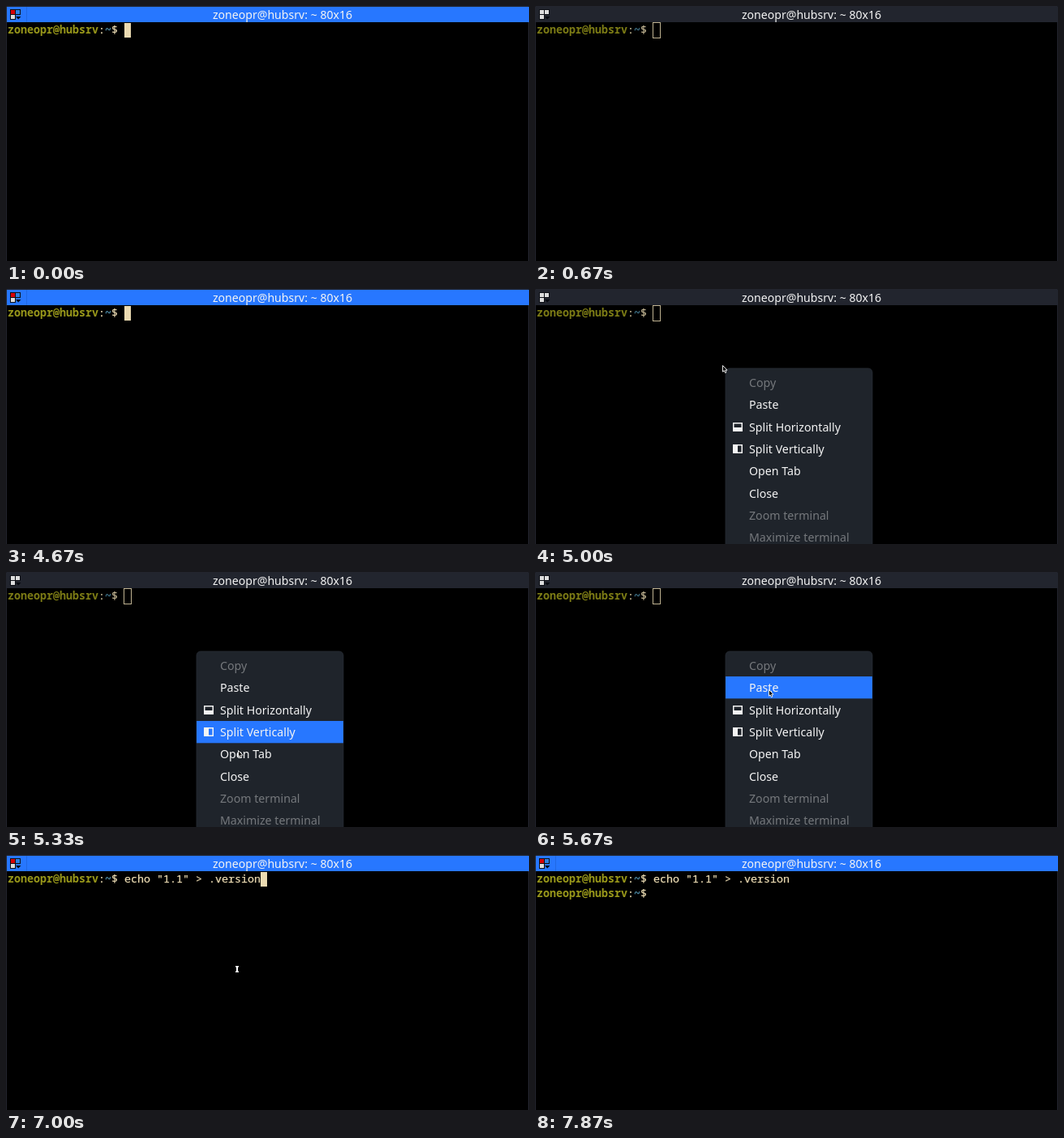
Animation, 645 px wide and 315 px high, one loop 8 s. Source, as an HTML page:

```html
<!DOCTYPE html>
<html lang="en">
<head>
<meta charset="utf-8">
<title>Terminal paste</title>
<style>
html, body { margin: 0; width: 100%; height: 100%; overflow: hidden; background: #000; }
svg { display: block; width: 645px; height: 315px; }
text { white-space: pre; }
.ui { font: 14.2px "Noto Sans", "Open Sans", sans-serif; fill: #f4f4f4; }
.title { font-size: 14.1px; }
.mono {
  font: 13.333px "Noto Sans Mono", "DejaVu Sans Mono", monospace;
  fill: #ebdbb2; stroke: #ebdbb2; stroke-width: .25;
}
.user { font-weight: 700; fill: #98971a; stroke: none; }
.path { font-weight: 700; fill: #4a86a0; stroke: #4a86a0; }
.off { fill: #75787c; }
#bar { fill: #22252e; }
#sep { fill: none; }
.pane { fill: #ddd; stroke: #0d0f15; }
#hollow { fill: none; stroke: #ebdbb2; }
#block { fill: #ebdbb2; }
#screen { opacity: .82; }
.focus #screen { opacity: 1; }
.focus #bar { fill: #2777ff; }
.focus #sep { fill: #2069e4; }
.focus .red { fill: #d80000; }
.focus .blue { fill: #2a7fe0; }
</style>
</head>
<body>
<svg id="stage" viewBox="0 0 645 315">
  <defs>
    <g id="prompt"><text class="mono"><tspan class="user">zoneopr@hubsrv</tspan>:<tspan class="path">~</tspan>$</text></g>
  </defs>
  <rect width="645" height="315"/>
  <path d="M.5 315V.5H644.5V315" fill="none" stroke="#23252e"/>
  <rect id="bar" x="1" y="1" width="644" height="19"/>
  <rect id="sep" x="25" y="1" width="1" height="19"/>
  <rect class="pane red" x="5.5" y="4.5" width="6" height="6"/>
  <rect class="pane blue" x="11.5" y="4.5" width="6" height="6"/>
  <rect class="pane" x="5.5" y="10.5" width="6" height="6"/>
  <path d="M12 13H18.5L15.2 16.5Z" fill="#080a10"/>
  <text class="ui title" x="341" y="16" text-anchor="middle">zoneopr@hubsrv: ~ 80x16</text>

  <g id="screen">
    <use href="#prompt" x="2" y="34"/>
    <text id="command" class="mono" x="146" y="34">echo "1.1" &gt; .version</text>
    <use id="next" href="#prompt" x="2" y="52"/>
    <rect id="block" width="8" height="18"/>
    <rect id="hollow" x="145.5" y="20.5" width="9" height="19"/>
  </g>

  <g id="menu">
    <rect x="235" y="98" width="181" height="230" rx="5" fill="#1f242b" stroke="#262b33" stroke-width=".8"/>
    <rect id="hover" x="235" width="181" height="27.3" fill="#2777ff"/>
    <g id="items"></g>
    <g fill="#f4f4f4">
      <path fill-rule="evenodd" d="M244 165H256V176H244ZM245.5 166.5V171H254.5V166.5Z"/>
      <path fill-rule="evenodd" d="M244 192H256V203H244ZM250 193.5V201.5H254.5V193.5Z"/>
    </g>
  </g>

  <path id="beam" d="M0 1H4V2.5H3V7.5H4V9H0V7.5H1V2.5H0Z" fill="#fff"/>
  <path id="arrow" d="M.5 .5V8.2L2.2 6.8L3.5 9.6L4.9 9L3.7 6.2H6Z" fill="#000" stroke="#fff" stroke-width=".9"/>
</svg>
<script>
const LOOP = 8000, ROW = 27.3, TOP = 102;
const $ = id => document.getElementById(id);
const show = (id, on) => { $(id).style.display = on ? "" : "none"; };
const within = (k, from, to) => k >= from && k < to;

const labels = ["Copy", "Paste", "Split Horizontally", "Split Vertically",
  "Open Tab", "Close", "Zoom terminal", "Maximize terminal"];
const disabled = new Set([0, 6, 7]);
labels.forEach((label, i) => {
  const t = document.createElementNS("http://www.w3.org/2000/svg", "text");
  t.setAttribute("class", disabled.has(i) ? "ui off" : "ui");
  t.setAttribute("x", 264);
  t.setAttribute("y", Math.round(121 + i * ROW));
  t.textContent = label;
  $("items").append(t);
});

// Pointer stops over the menu, one per tick
const menuPath = [[231, 94], [240, 106], [254, 130], [268, 165], [280, 196], [286, 220],
  [286, 220], [288, 204], [289, 187], [289, 165], [288, 145]];

function beamAt(k) {
  if (within(k, 58, 70)) {
    const u = Math.min(1, (k - 58) / 7), p = 1 - (1 - u) ** 2;
    return [Math.round(115 + 111 * p), Math.round(204 - 118 * p)];
  }
  if (within(k, 90, 106)) return [283, 136];
  if (within(k, 115, 118)) return [220 - 96 * (k - 115), 129 - 11 * (k - 115)];
  return null;
}

function arrowAt(k) {
  return within(k, 75, 90) ? menuPath[Math.min(k - 75, menuPath.length - 1)] : null;
}

function place(id, pos) {
  show(id, pos);
  if (pos) $(id).setAttribute("transform", `translate(${pos})`);
}

function render(k) {
  const focus = k < 10 || within(k, 66, 73) || k >= 90;
  const blinkOff = within(k, 99, 105) || k >= 115;
  $("stage").classList.toggle("focus", focus);
  show("command", k >= 94);
  show("next", k >= 110);
  show("hollow", !focus);
  show("block", focus && !blinkOff);
  $("block").setAttribute("x", within(k, 94, 110) ? 314 : 146);
  $("block").setAttribute("y", k >= 110 ? 39 : 21);

  const arrow = arrowAt(k);
  const row = arrow ? Math.min(3, Math.floor((arrow[1] - TOP) / ROW)) : 0;
  show("menu", within(k, 74, 90));
  show("hover", row > 0);
  $("hover").setAttribute("y", Math.round(TOP + row * ROW));
  place("arrow", arrow);
  place("beam", beamAt(k));
}

// The picture advances 15 times a second
const start = performance.now();
function frame() {
  const t = (performance.now() - start) % LOOP;
  render(Math.floor(t * 0.015 + 0.06));
  requestAnimationFrame(frame);
}
frame();
</script>
</body>
</html>
```
